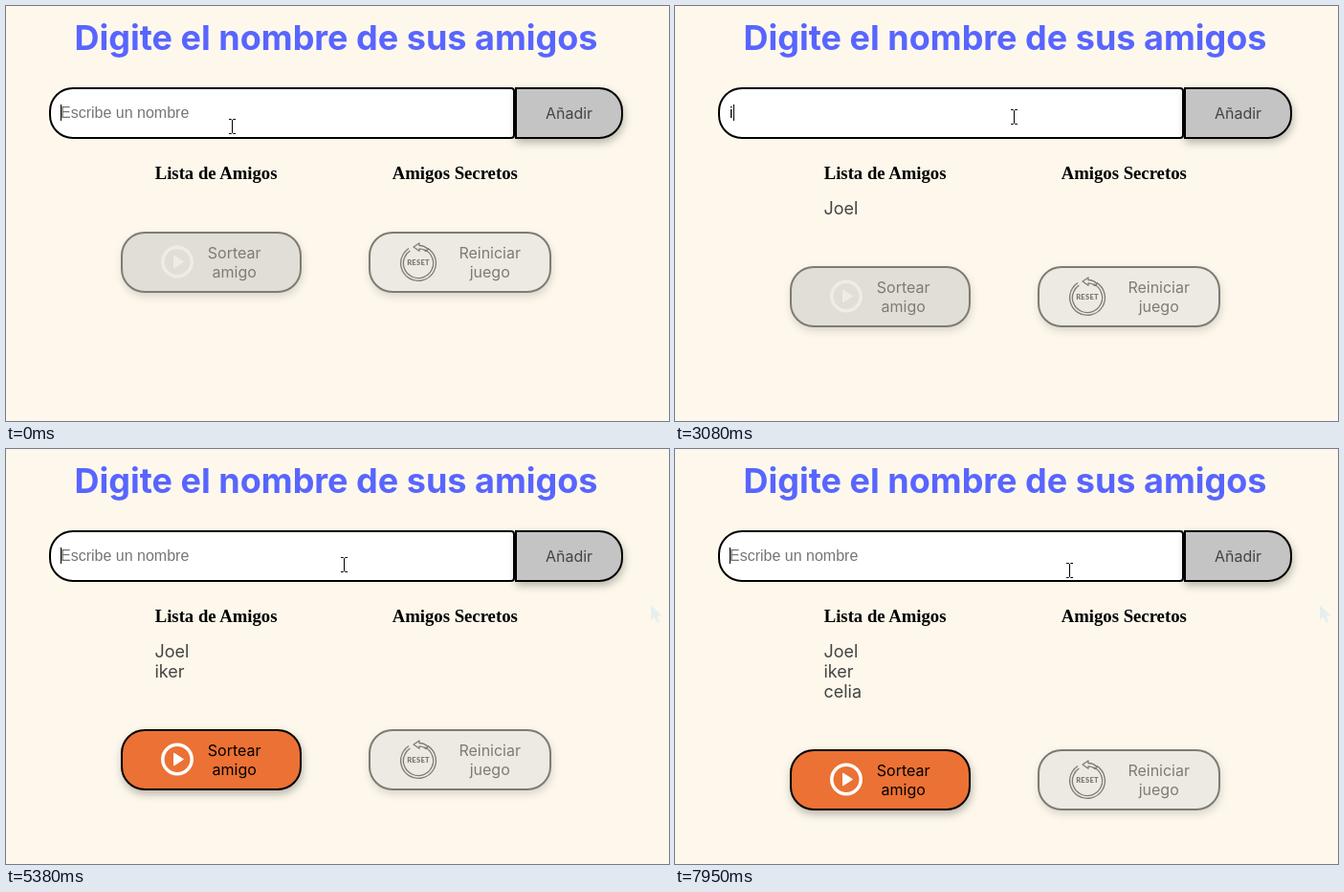
An HTML page that plays this animation: 693 by 434 pixels, repeating every 8 s.

```html
<!DOCTYPE html>
<html lang="es">
<head>
<meta charset="utf-8">
<title>Amigos</title>
<style>
  html, body { margin: 0; width: 100%; height: 100%; overflow: hidden; background: #fdf8eb; }
  svg { display: block; width: 693px; height: 434px; }
  text { font: 16px Inter, sans-serif; font-optical-sizing: none; white-space: pre; }
  .title { font-size: 36px; font-weight: 700; fill: #5865ff; text-anchor: middle; }
  .head { font: bold 18.72px "Liberation Serif", "Times New Roman", serif; }
  .field { font: 16px "Liberation Sans", Arial, sans-serif; }
  .item { font-size: 18px; fill: #444; }
  .mid { text-anchor: middle; }
  .edge { stroke: #000; stroke-width: 2; }
  .shadow { filter: drop-shadow(1px 4px 4px rgba(0, 0, 0, .27)); }
  .reset { font: 900 7.5px Lato, sans-serif; text-anchor: middle; letter-spacing: .3px; }
  .off, .off .icon { opacity: .5; }
</style>
</head>
<body>
<svg viewBox="0 0 693 434">
  <defs>
    <path id="arrowShape" d="M0 0v16l3.7-3.3 2.6 6 3-1.3-2.6-5.8h5z"/>
  </defs>

  <text class="title" x="345" y="46">Digite el nombre de sus amigos</text>

  <path id="input" class="edge" fill="#fff"/>
  <text id="typed" class="field" x="57" y="117"></text>
  <rect id="caret" y="103" width="1" height="17"/>

  <path id="add" class="edge shadow" d="M533 86H620a24 24 0 0 1 24 24v4a24 24 0 0 1-24 24H533z"/>
  <text class="mid" x="588.5" y="118" fill="#444">Añadir</text>

  <text class="head" x="155.7" y="181">Lista de Amigos</text>
  <text class="head" x="403.7" y="181">Amigos Secretos</text>
  <g id="list"></g>

  <g id="actions">
    <g id="draw">
      <rect id="drawBox" class="edge shadow" x="121" y="237" width="187" height="62" rx="24"/>
      <g class="icon">
        <circle cx="179" cy="267.5" r="15.2" fill="none" stroke="#fff" stroke-width="3.5"/>
        <path d="M175.5 261l10 6.5-10 6.5z" fill="#fff" stroke="#fff" stroke-linejoin="round"/>
      </g>
      <text class="mid" x="238.7" y="264">Sortear</text>
      <text class="mid" x="238.7" y="284">amigo</text>
    </g>
    <g class="off">
      <rect class="edge shadow" x="380" y="237" width="189" height="62" rx="24" fill="#ddd"/>
      <g fill="none" stroke="#000" stroke-width="1.3" stroke-linejoin="round">
        <circle cx="431" cy="269" r="18.4" pathLength="100" stroke-dasharray="82 18" transform="rotate(-58 431 269)"/>
        <circle cx="431" cy="269" r="15.6" pathLength="100" stroke-dasharray="84 16" transform="rotate(-66 431 269)"/>
        <path d="M426 252l6-4v2.500q6 .2 9 4l-2 2q-3-2.600-7-2.600v2.300z"/>
      </g>
      <text class="reset" x="431" y="271">RESET</text>
      <text class="mid" x="505.7" y="264">Reiniciar</text>
      <text class="mid" x="505.7" y="284">juego</text>
    </g>
  </g>

  <use id="trace" href="#arrowShape" x="674" y="163" fill="#e8eef0"/>
  <circle id="press" r="12.5" fill="#d8c62c" opacity=".8"/>
  <g id="pointer">
    <path id="beam" d="M-3-7.500h2.500l1 1 1-1h2.500M.5-6.500v13M-3 7.500h2.500l1-1 1 1h2.500" fill="none" stroke="#000"/>
    <path id="hand" transform="scale(1.1)" d="M-1.800 1.500q0-1.800 1.700-1.800t1.700 1.800v5.500q2.600-1 3.300 .8 2.400-.8 3.100 1 2.800-.6 2.800 2v4.500q0 2-1.500 4v2.700h-8.500v-2.500q-3-3-4.800-6.800-.8-2 .8-2.300 1 0 1.400 1zM1.600 7v4.500M4.900 8v3.800M8 9v3" fill="#fff" stroke="#000"/>
    <use id="arrow" href="#arrowShape" fill="#fff" stroke="#000"/>
  </g>
</svg>
<script>
const LOOP = 8000, PRESS = 70, BLINK = 530;
const $ = id => document.getElementById(id);

// Each round: focus the field, type a name, press the button.
const rounds = [
  { name: "Joel", focus: 0, keys: [130, 530, 790, 860], press: 2390 },
  { name: "iker", focus: 2870, keys: [3080, 3210, 3550, 3810], press: 4640 },
  { name: "celia", focus: 5380, keys: [5780, 6510, 6580, 7040, 7110], press: 7530 }
];
const events = rounds.flatMap(r => [r.focus, ...r.keys, r.press + PRESS]);

const home = { x: 236, y: 126 };
const moves = [
  { from: 1920, to: 2260, x: 583, y: 115 },
  { from: 2430, to: 2870, x: 354, y: 116 },
  { from: 3810, to: 3950, x: 591, y: 162 },
  { from: 4220, to: 4360, x: 674, y: 163 },
  { from: 4360, to: 4570, x: 583, y: 115 },
  { from: 4710, to: 4920, x: 353, y: 121 },
  { from: 7110, to: 7400, x: 583, y: 110 },
  { from: 7740, to: 7950, x: 412, y: 127 }
];

const show = (el, on) => el.style.display = on ? "" : "none";
const set = (el, attrs) => Object.entries(attrs).forEach(([k, v]) => el.setAttribute(k, v));
const ease = u => u * u * (3 - 2 * u);
const inputShape = r =>
  `M${531 - r} 86H70a24 24 0 0 0-24 24v4a24 24 0 0 0 24 24H${531 - r}` +
  `q${r} 0 ${r} ${-r}V${86 + r}q0 ${-r} ${-r} ${-r}z`;

const items = rounds.map(({ name }, i) => {
  const el = document.createElementNS("http://www.w3.org/2000/svg", "text");
  set(el, { class: "item", x: 155.4, y: 218 + 21 * i });
  el.textContent = name;
  $("list").append(el);
  return el;
});

function pointerAt(t) {
  let { x, y } = home;
  for (const m of moves) {
    const k = ease(Math.min(1, Math.max(0, (t - m.from) / (m.to - m.from))));
    x += (m.x - x) * k;
    y += (m.y - y) * k;
  }
  return { x: Math.round(x), y: Math.round(y) };
}

function drawForm(t, pressed) {
  const count = rounds.filter(r => t >= r.press + PRESS).length;
  const round = rounds[count];
  const letters = round ? round.keys.filter(k => t >= k).length : 0;
  const typed = $("typed");
  typed.textContent = letters ? round.name.slice(0, letters) : "Escribe un nombre";
  set(typed, { fill: letters ? "#000" : "#757575" });

  const width = letters ? typed.getComputedTextLength() : 0;
  const idle = t - Math.max(...events.filter(e => e <= t));
  set($("caret"), { x: Math.round(57 + width) });
  show($("caret"), !pressed && idle % (2 * BLINK) < BLINK);
  set($("input"), { d: inputShape(pressed ? 0 : 3) });

  const ready = count > 1;
  items.forEach((el, i) => show(el, i < count));
  set($("actions"), { transform: `translate(0 ${count ? 15 + 21 * count : 0})` });
  set($("draw"), { class: ready ? "" : "off" });
  set($("drawBox"), { fill: ready ? "#ec7134" : "#c5c5c5" });
}

function drawPointer(t, pressed) {
  const { x, y } = pointerAt(t);
  const inRow = y >= 85 && y < 139;
  const onButton = inRow && x >= 532 && x < 645;
  const onInput = inRow && x < 532;
  set($("pointer"), { transform: `translate(${x} ${y})` });
  show($("hand"), onButton);
  show($("beam"), onInput);
  show($("arrow"), !onButton && !onInput);
  set($("add"), { fill: onButton ? "#a1a1a1" : "#c4c4c4" });
  set($("press"), { cx: x, cy: y });
  show($("press"), pressed);
  show($("trace"), t > 4360);
}

function render(t) {
  const pressed = rounds.some(r => t >= r.press && t < r.press + PRESS);
  drawForm(t, pressed);
  drawPointer(t, pressed);
}

const start = performance.now();
function tick() {
  render((performance.now() - start) % LOOP);
  requestAnimationFrame(tick);
}
tick();
</script>
</body>
</html>
```
